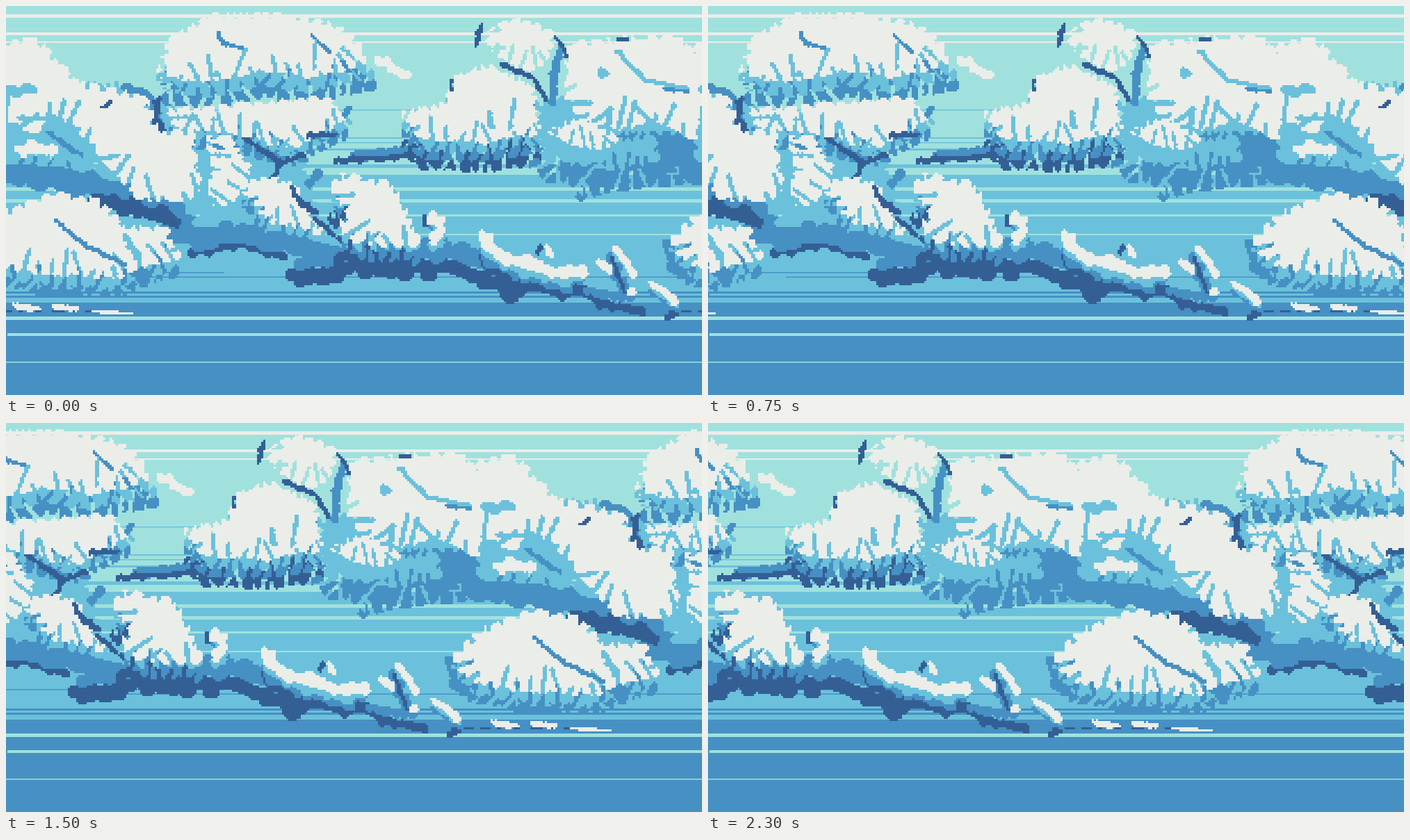
An HTML page with a canvas for the animation above (2320 ms loop, 1001 px wide and 560 px high).

```html
<!DOCTYPE html>
<html>
<head>
<meta charset="utf-8">
<style>
html, body { margin: 0; width: 100%; height: 100%; overflow: hidden; background: #4690c3; }
canvas { display: block; width: 100vw; height: 100vh; }
</style>
</head>
<body>
<canvas id="stage" width="1001" height="560"></canvas>
<script>
const WIDTH = 1001, COLS = 334, ROWS = 154, CELL = WIDTH / COLS;
const AQUA = '#a0e1de', WHITE = '#ebede9', LIGHT = '#6bc1db', MID = '#4690c3', DARK = '#345f95';

function makeContext(w, h) {
  const c = document.createElement('canvas');
  c.width = w;
  c.height = h;
  return c.getContext('2d', { willReadFrequently: true });
}

let seed = 7;
const rand = (min, max) => {
  seed = (seed * 16807) % 2147483647;
  return min + (max - min) * seed / 2147483647;
};
const strip = makeContext(COLS, ROWS), layer = makeContext(COLS, ROWS);

// Paint one shape, wrapped around the strip, with hard pixel edges.
function stamp(color, drop, draw) {
  layer.setTransform(1, 0, 0, 1, 0, 0);
  layer.clearRect(0, 0, COLS, ROWS);
  layer.fillStyle = layer.strokeStyle = color;
  layer.lineCap = layer.lineJoin = 'round';
  for (const turn of [-1, 0, 1]) {
    layer.setTransform(1 / CELL, 0, 0, 1 / CELL, turn * COLS, drop / CELL);
    draw();
  }
  const img = layer.getImageData(0, 0, COLS, ROWS), d = img.data;
  const rgb = [1, 3, 5].map(i => parseInt(color.substr(i, 2), 16));
  for (let i = 0; i < d.length; i += 4) d.set([...rgb, d[i + 3] > 127 ? 255 : 0], i);
  layer.putImageData(img, 0, 0);
  strip.drawImage(layer.canvas, 0, 0);
}

const pairs = n => n.reduce((list, v, i) => (i % 2 ? list : [...list, [v, n[i + 1]]]), []);

function trace(pts) {
  layer.beginPath();
  pts.forEach(p => layer.lineTo(...p));
}

function dots(list) {
  layer.beginPath();
  for (const [x, y, r] of list) {
    layer.moveTo(x + r, y);
    layer.arc(x, y, r, 0, 7);
  }
  layer.fill();
}

// Visit points at random spacing with the unit normal (inward when clockwise).
function walk(pts, gap, visit) {
  for (let i = 1; i < pts.length; i++) {
    const [x, y] = pts[i - 1], dx = pts[i][0] - x, dy = pts[i][1] - y, len = Math.hypot(dx, dy);
    for (let s = rand(0, gap); s < len; s += gap * rand(.7, 1.3))
      visit(x + dx * s / len, y + dy * s / len, -dy / len, dx / len);
  }
}

// Tones from the deepest shadow up; a drop of 0 leaves that tone out.
const tones = (light, mid, dark) =>
  [[DARK, dark], [MID, mid], [LIGHT, light]].filter(t => t[1]).concat([[WHITE, 0]]);
const flat = color => [[color, 0]];

// Clockwise outline: puffs round the rim, crevices cut up from below.
function cloud(shades, r, ...n) {
  const pts = pairs(n), rim = [...pts, pts[0]];
  for (const [color, drop] of shades) {
    const puffs = [], cuts = [];
    walk(rim, r * 1.35, (x, y, nx, ny) => {
      const size = r * rand(.55, 1.1);
      puffs.push([x + nx * size * .3, y + ny * size * .3, size]);
    });
    walk(rim, r * 2, (x, y, nx, ny) => {
      const depth = ny < -.2 ? rand(0, 3.4) * r : 0, lean = rand(-.7, .7);
      for (let s = -r; s <= depth; s += 2)
        cuts.push([x + nx * s - ny * lean * s, y + ny * s + nx * lean * s, r * rand(.22, .4)]);
    });
    stamp(color, drop, () => {
      trace(pts);
      layer.fill();
      dots(puffs);
      layer.globalCompositeOperation = 'destination-out';
      dots(cuts);
      layer.globalCompositeOperation = 'source-over';
    });
  }
}

// Lumpy string of puffs along a spine.
function vein(shades, w, ...n) {
  const pts = pairs(n);
  for (const [color, drop] of shades) {
    const puffs = [];
    walk(pts, w * .55, (x, y, nx, ny) => {
      const off = rand(-.35, .35) * w;
      puffs.push([x + nx * off, y + ny * off, w * rand(.25, .5)]);
    });
    stamp(color, drop, () => {
      trace(pts);
      layer.lineWidth = w * .6;
      layer.stroke();
      dots(puffs);
    });
  }
}

function bar(color, x, y, w, h) {
  stamp(color, 0, () => layer.fillRect(x, y, w, h));
}

const light = flat(LIGHT), mid = flat(MID), dark = flat(DARK), white = flat(WHITE);

function rightBank() {
  vein(mid, 18, 500, 214, 600, 208);
  vein(dark, 10, 472, 222, 590, 216);
  cloud(tones(15, 27, 42), 9, 574, 155, 632, 142, 645, 105, 690, 88, 755, 115, 768, 180, 690, 193, 598, 188);
  vein(light, 9, 697, 152, 697, 175);
  vein(light, 8, 733, 135, 724, 178);
  vein(dark, 6, 640, 108, 640, 122);

  cloud(light, 10, 765, 140, 880, 130, 1040, 150, 1010, 240, 880, 250, 775, 235);
  cloud(mid, 9, 760, 225, 860, 232, 885, 185, 970, 185, 1060, 220, 1150, 250, 1170, 278, 1010, 250, 890, 260, 825, 276, 840, 258, 780, 250);
  cloud(light, 9, 880, 195, 930, 190, 935, 220, 870, 232, 850, 215);
  bar(LIGHT, 949, 240, 46, 4);

  vein(mid, 13, 797, 62, 786, 100, 788, 140);
  cloud(white, 9, 690, 38, 730, 18, 785, 38, 782, 75, 755, 95, 705, 68);
  vein(dark, 9, 685, 27, 676, 58);
  vein(dark, 9, 712, 84, 758, 103, 778, 135);
  vein(dark, 8, 790, 44, 810, 72);

  cloud(white, 11, 812, 56, 870, 52, 910, 47, 965, 45, 1003, 80, 1040, 100, 1040, 150, 990, 188, 930, 158, 880, 174, 816, 147, 805, 110);
  vein(light, 8, 878, 65, 920, 108, 1000, 122);
  vein(light, 15, 855, 92, 857, 100);
  vein(mid, 7, 945, 118, 990, 124);
  vein(dark, 6, 878, 48, 895, 47);
  cloud(white, 8, 784, 180, 830, 160, 876, 190, 868, 204, 800, 193);
}

function leftBank() {
  cloud(light, 9, 0, 110, 160, 115, 245, 150, 420, 200, 450, 330, 280, 330, 120, 250, -10, 235);
  cloud(tones(22, 38), 10, 222, 85, 242, 45, 295, 14, 400, 14, 480, 30, 525, 78, 440, 98, 370, 88, 300, 104, 225, 98);
  vein(white, 14, 534, 76, 580, 100);
  vein(mid, 7, 303, 38, 312, 54, 340, 60);
  vein(mid, 6, 438, 42, 464, 66);
  vein(light, 6, 445, 50, 442, 90);

  cloud(tones(10, 26), 9, 236, 152, 345, 143, 458, 132, 493, 160, 410, 203, 320, 178, 245, 172);
  vein(mid, 13, 493, 147, 487, 158);
  vein(dark, 8, 432, 186, 475, 184);
  vein(dark, 9, 342, 190, 395, 225, 430, 215);
  vein(dark, 9, 395, 225, 378, 258);
  vein(mid, 16, 446, 240, 436, 257);

  vein(mid, 44, -20, 238, 80, 245, 170, 272, 270, 318);
  vein(dark, 26, 128, 276, 190, 292, 245, 312);
  vein(mid, 16, 170, 117, 205, 130, 225, 180);
  vein(dark, 12, 220, 133, 214, 160, 229, 190);
  cloud(white, 11, -12, 58, 42, 48, 75, 88, 104, 114, 195, 132, 215, 184, 265, 184, 276, 270, 246, 278, 188, 273, 130, 200, 85, 155, 60, 145, 40, 176, -12, 155);
  vein(light, 18, 0, 120, 40, 122);
  vein(mid, 9, 60, 182, 110, 215);
  vein(white, 20, 18, 205, 68, 208);
  vein(dark, 7, 138, 146, 152, 138);
  cloud(white, 9, 290, 190, 320, 190, 350, 238, 330, 275, 305, 288, 290, 265, 300, 235);
}

function ridge() {
  vein(light, 46, 280, 315, 450, 315);
  vein(dark, 19, 265, 354, 340, 342, 400, 360);
  vein(mid, 36, 255, 330, 330, 330, 410, 342, 500, 362);
  vein(dark, 30, 410, 386, 455, 390, 495, 376);
  vein(mid, 24, 420, 372, 490, 360);
  vein([[DARK, 22], [MID, 0]], 30, 515, 352, 640, 354, 740, 388);
  cloud(tones(8, 22), 9, 340, 260, 372, 248, 410, 258, 450, 324, 380, 308, 352, 272);
  vein(dark, 10, 410, 260, 420, 280, 446, 298);
  vein(dark, 8, 442, 305, 485, 340);
  cloud(tones(8, 22, 44), 10, 470, 262, 485, 245, 556, 258, 572, 290, 590, 338, 515, 342, 478, 320, 495, 300);
  vein(dark, 10, 602, 303, 604, 315);
  vein(tones(8, 18), 18, 614, 300, 628, 322, 615, 340);
  vein(tones(9, 17, 28), 20, 685, 328, 690, 345, 740, 370, 802, 386, 830, 378);
  vein(dark, 10, 767, 346, 765, 356);
  vein(white, 12, 777, 346, 786, 360);

  vein(dark, 15, 820, 405, 860, 429, 915, 438);
  vein(dark, 16, 952, 448, 964, 442);
  vein([[MID, 10], [LIGHT, 0]], 16, 835, 398, 900, 410);
  vein(mid, 18, 868, 360, 888, 410);
  vein(dark, 7, 872, 362, 890, 412);
  vein(white, 16, 878, 348, 903, 386);
  vein(white, 14, 852, 368, 868, 382);
  vein(white, 14, 900, 408, 903, 412);
  vein(tones(5, 11), 13, 928, 398, 964, 426);
}

function lowBank() {
  vein(mid, 18, -52, 340, -42, 370, -15, 392);
  cloud(tones(14, 26), 10, -42, 335, 0, 300, 70, 270, 130, 282, 175, 322, 226, 320, 246, 360, 200, 370, 160, 388, 45, 380, -20, 370);
  vein(mid, 7, 72, 308, 110, 342, 172, 372);
  vein(light, 12, 172, 330, 190, 362);
  vein(mid, 22, 195, 382, 202, 386);
  vein(mid, 12, 45, 412, 100, 412);
}

function farClouds() {
  for (let x = -30; x < 160; x += 24) bar(DARK, x, 437, rand(6, 22), 4);
  vein(white, 11, 11, 430, 47, 435);
  vein(white, 9, 68, 433, 101, 436);
  bar(WHITE, 124, 437, 38, 3);
  bar(WHITE, 134, 440, 50, 4);
}

rightBank();
leftBank();
ridge();
lowBank();
farClouds();

// Still sky and sea: color, then top and height of each band.
const bands = [
  [AQUA, 0, 243], [WHITE, 12, 5, 38, 4, 51, 2],
  [LIGHT, 149, 1.5, 189, 2, 196, 1.5, 205, 3, 228, 5, 243, 184],
  [AQUA, 261, 5, 278, 5, 300, 3, 328, 2],
  [MID, 411, 3, 417, 3, 427, 133], [AQUA, 447, 5, 512, 1.5]
];
const sky = makeContext(WIDTH, 560);
for (const [color, ...n] of bands) {
  sky.fillStyle = color;
  for (const [y, h] of pairs(n)) sky.fillRect(0, y, WIDTH, h);
}
sky.fillRect(2, 471, WIDTH, 4);
sky.fillStyle = MID;
sky.fillRect(0, 383, 314, 1.5);
sky.fillRect(112, 389.5, WIDTH, 1.5);

// The wind starts strong and settles to 9 pixels per 50 ms step.
const scrollAt = step => Math.round(9 * step + 44 * (1 - Math.exp(-step / 8.3)));

const view = document.getElementById('stage').getContext('2d');
view.imageSmoothingEnabled = false;
function frame() {
  const shift = scrollAt(Math.floor(performance.now() % 2320 / 50));
  view.drawImage(sky.canvas, 0, 0);
  for (const x of [-shift, WIDTH - shift]) view.drawImage(strip.canvas, x, 0, WIDTH, ROWS * CELL);
  requestAnimationFrame(frame);
}
frame();
</script>
</body>
</html>
```
